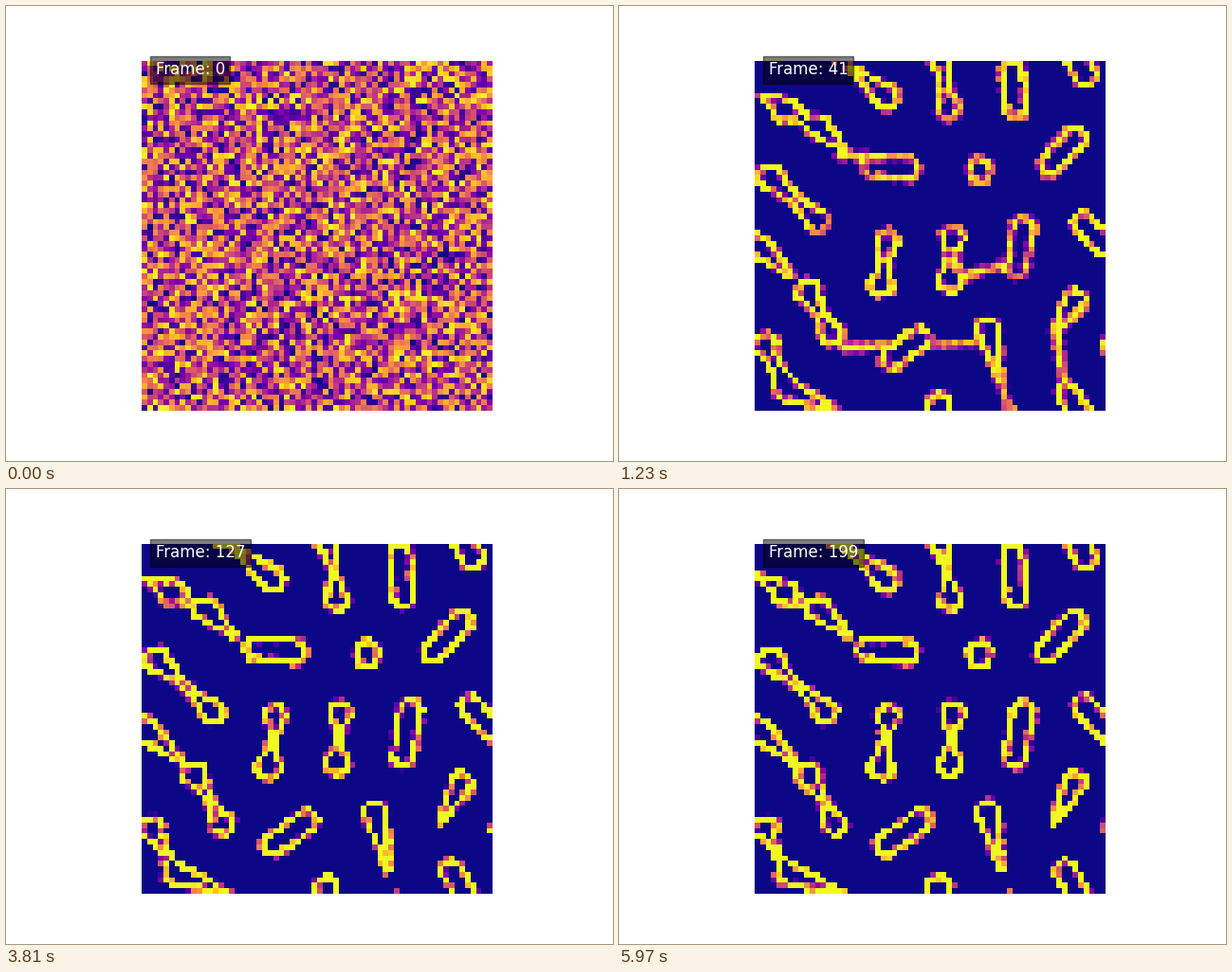
Recreate the animation shown at these times as a matplotlib script. Size 640 by 480 pixels, loop 6000 ms.

```python
import numpy as np
import matplotlib.pyplot as plt
from matplotlib.animation import FuncAnimation

N, FRAMES, RATE = 64, 200, 0.12
SIDE, LEFT, TOP = 369.6, 143.2, 57.6      # wrapped board in stage pixels

rng = np.random.RandomState(42)
noise, rough, phase, speed = rng.rand(4, N, N)
phase = phase * 2 * np.pi
speed = 0.05 + 0.2 * speed

step = (np.arange(N) + 0.5) * SIDE / N
X, Y = np.meshgrid(LEFT + step, TOP + step)

# Each body runs from its first head to its far end: x, y, x, y.
dumbbells = [(338, 422, 349, 486), (160, 181, 218, 235), (277, 293, 284, 241),
             (349, 289, 352, 238), (200, 303, 228, 353), (155, 359, 178, 405),
             (176, 111, 211, 128)]
capsules = [(415, 70, 419, 114), (492, 442, 470, 403), (490, 230, 516, 257),
            (426, 235, 418, 283), (479, 141, 450, 173), (317, 351, 282, 376),
            (304, 172, 262, 169), (380, 173, 381, 177)]
tapers = [(282, 466, 238, 430), (389, 342, 403, 402), (480, 311, 457, 352),
          (178, 405, 235, 428), (178, 110, 148, 94), (211, 128, 242, 155),
          (149, 255, 187, 290)]
# Short-lived bridges between the first heads.
strands = [(200, 310, 235, 358), (240, 360, 385, 356), (395, 365, 410, 425),
           (232, 157, 272, 160), (355, 288, 430, 267), (460, 340, 470, 410)]


def wrap(d):
    return (d + SIDE / 2) % SIDE - SIDE / 2


def ramp(t, a, b):
    f = np.clip((t - a) / (b - a), 0, 1)
    return f * f * (3 - 2 * f)


def bell(x, y, w, h):
    return np.exp(-(wrap(X - x) / w) ** 2 - (wrap(Y - y) / h) ** 2)


def void(x, y):
    """Scaled distance from the middle of the early void; 1 is its rim."""
    return np.hypot((x - 375) / 98, (y - 170) / 74)


def body(ends, grow, r0, r1, waist=0):
    """Signed distance to a body whose radius runs from r0 to r1."""
    ax, ay, bx, by = ends
    ux, uy = (bx - ax) * grow, (by - ay) * grow
    px, py = wrap(X - ax), wrap(Y - ay)
    h = np.clip((px * ux + py * uy) / (ux * ux + uy * uy), 0, 1)
    radius = r0 + (r1 - r0) * h - waist * np.sin(np.pi * h)
    return np.hypot(px - h * ux, py - h * uy) - radius


def distance(t):
    """Union of all bodies; those inside the void are born late."""
    grow = np.interp(t, (25, 41, 71), (0.35, 0.85, 1))
    late = 20 * (1 - ramp(t, 27, 42))
    parts = [body(e, grow, 16, 15, 9 * grow ** 2) for e in dumbbells]
    parts += [body(e, grow, 15, 14) + late * (void(*e[:2]) < 1.05) for e in capsules]
    parts += [body(e, grow, 15, 5) for e in tapers]
    fade = 16 * ramp(t, 32, 56)
    if fade < 16:
        parts += [body(e, 1, 11 - fade, 9 - fade) for e in strands]
    return np.min(parts, axis=0)


def early_rim():
    """Bright thin rim on the left of the void, a dim broad one on the right."""
    side = ramp(X, 300, 440)
    gap = 86 * (void(X, Y) - 1)
    rim = (0.75 - 0.5 * side) * np.exp(-(gap / (5 + 14 * side)) ** 2)
    rim *= 1 - 0.35 * rough
    haze = 0.2 * np.maximum(bell(296, 185, 16, 35), bell(492, 182, 26, 20))
    return np.maximum(rim, haze)


rim = early_rim()


def target(t):
    if t < 5:
        return np.zeros((N, N))
    d = distance(t + 3) + 1.2 * np.sin(phase + speed * t)
    soft = np.interp(t, (6, 24, 45), (14, 5, 2))
    thick = np.interp(t, (25, 41), (10, 7.3))
    outer = np.clip(0.5 - d / soft, 0, 1)
    hollow = 1 - np.clip(0.5 + (d + thick) / soft, 0, 1)
    early = 1 - ramp(t, 24, 38)
    cells = outer * (1 - hollow * (1 - 0.3 * early)) * (1 - 0.45 * early * rough)
    cells = np.maximum(cells, rim * early)
    s = ramp(t, 5, 18)
    return s * cells + (1 - s) * 0.8 * np.clip(noise - 0.45, 0, 1)


def simulate():
    """Every cell moves towards its target at a limited rate."""
    states = [noise]
    for t in range(1, FRAMES):
        grid = states[-1]
        states.append(grid + np.clip(target(t) - grid, -RATE, RATE))
    return states


states = simulate()

fig, ax = plt.subplots(figsize=(6.4, 4.8), dpi=100)
ax.axis("off")
image = ax.imshow(states[0], cmap="plasma", vmin=0, vmax=1, interpolation="nearest")
label = ax.text(2, 2, "Frame: 0", color="white", fontsize=12,
                bbox=dict(facecolor="black", alpha=0.5))


def update(i):
    image.set_data(states[i])
    label.set_text(f"Frame: {i}")
    return image, label


anim = FuncAnimation(fig, update, frames=FRAMES, interval=30, repeat=True,
                     repeat_delay=0)
plt.show()
```
